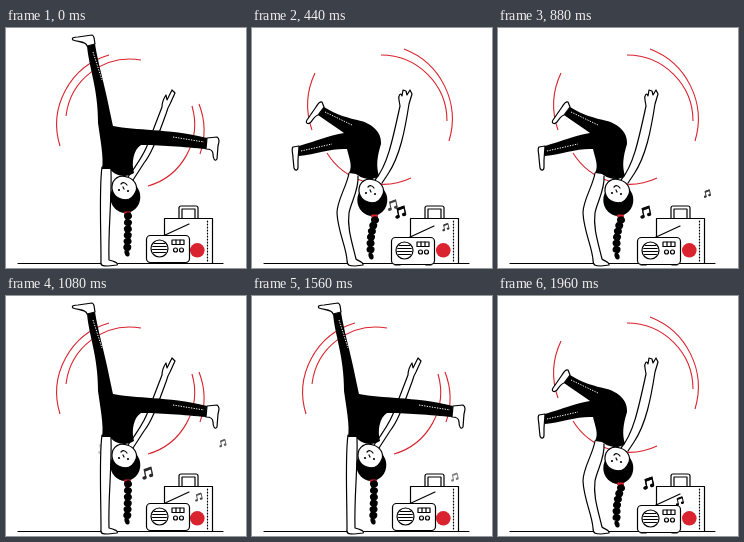
Recreate the animation shown at these times as an HTML page. Size 240 by 240 pixels, loop 2 s.

```html
<!DOCTYPE html>
<html lang="en">
<head>
<meta charset="utf-8">
<title>Handstand to the radio</title>
<style>
  html, body { margin: 0; width: 100%; height: 100%; overflow: hidden; background: #fff; }
  svg { display: block; width: 100vw; height: 100vh; }
  .line { fill: none; stroke: #000; stroke-width: 1.2; stroke-linecap: round; stroke-linejoin: round; }
  .skin { fill: #fff; stroke: #000; stroke-width: 1.2; stroke-linejoin: round; stroke-linecap: round; }
  .arc { fill: none; stroke: #d9232e; stroke-width: 1.1; }
  .stitch { fill: none; stroke: #fff; stroke-width: 1; stroke-dasharray: 1.3 1.3; }
</style>
</head>
<body>
<svg id="stage" viewBox="0 0 240 240"></svg>
<script>
const LOOP = 2000, STEP = 40, BEAT = 125;

const path = (d, cls = '') => `<path class="${cls}" d="${d}"/>`;
const arc = (r, x1, y1, x2, y2) => path(`M${x1} ${y1}A${r} ${r} 0 0 1 ${x2} ${y2}`, 'arc');

const straightArm = 'M96 139C93 160 95 200 95 233C94 238 97 238 102 238L111 237C113 235 107 233 103 232C102 200 106 172 105 142';

const poses = [
  {
    arcs: [[72.5, 54, 118, 103, 27], [64.5, 60, 88, 135, 32], [72.5, 193, 76, 194, 126], [64.5, 186, 78, 142, 158]],
    body: 'M81 18L89 16C92 35 98 55 101 70C104 84 106 94 107 98C130 103 160 100 201 110L200 121C180 119 150 117 135 117C128 121 125 134 128 145C119 151 108 147 104 141L96 141C98 130 94 110 92 95C92 60 83 40 81 18Z',
    feet: ['M81 18C81 14 73 14 67 12C65 10 68 9 72 9L86 7C89 8 88 12 89 16Z',
           'M201 110L211 109C214 111 213 114 212 118L211 131C209 134 207 131 207 126C207 122 203 121 200 121Z'],
    arm: 'M122 149C130 138 137 128 141 118L156 79C156 74 158 70 160 67L161 72L166 62L169 65L164 76C162 79 161 82 160 86C151 110 146 125 138 135L127 152',
    support: straightArm,
    stitches: ['M87 24L96 52', 'M167 109L198 114'],
    head: [0, 0], braid: [122, 188, 122, 208, 121, 225],
    radio: 'translate(0 0)'
  },
  {
    arcs: [[73, 84, 155, 68, 54], [68, 90, 153, 64, 73], [72, 115, 29, 189, 83], [73, 199, 111, 177, 158]],
    body: 'M48 102C70 106 95 106 112 107C124 104 140 98 155 82L162 88C154 105 142 112 130 123C126 133 126 140 129 150C120 155 109 151 104 148L96 147C100 138 96 132 97 125C85 117 65 117 46 112Z',
    feet: ['M48 102L44 101C41 103 42 107 40 112L37 121C37 124 40 124 41 121C42 116 44 113 46 112Z',
           'M155 82L159 79L164 87L172 94C172 97 169 97 166 94L161 88Z'],
    arm: 'M124 154C136 137 142 112 153 86C150 81 153 76 154 73L157 77L156 71L160 70L160 75L164 72L164 79L159 87C154 108 149 128 138 146L131 157',
    support: 'M97 147C91 158 84 172 85 190C87 205 94 218 95 232C95 238 98 238 103 238L111 237C112 234 106 233 104 231C101 214 95 202 97 188C99 174 106 162 106 149',
    stitches: ['M49 106L82 111', 'M135 108L156 87'],
    head: [0, 4], braid: [120, 193, 119, 212, 117, 229],
    radio: 'translate(0 -1)'
  },
  {
    arcs: [[65, 63, 110, 108, 32], [78, 136, 18, 183, 34], [65, 191, 102, 130, 160], [75, 194, 126, 131, 165]],
    body: 'M120 12L128 13C130 45 130 80 126 104C124 119 125 130 128 144C119 151 108 147 104 141L96 141C98 132 96 124 96 117C72 120 45 124 18 126L18 116C45 109 70 103 111 101C114 70 114 40 120 12Z',
    feet: ['M120 12C119 8 118 5 120 3L127 3L140 5C143 7 142 9 138 9C133 9 129 9 128 13Z',
           'M18 116L7 118C4 119 5 122 6 126L7 139C8 143 11 142 11 138L12 130C13 127 16 126 18 126Z'],
    arm: 'M124 150C135 138 146 124 156 112L176 87C177 82 179 79 182 78L181 82L186 74L189 77L187 82C185 86 181 88 179 91C165 113 152 132 130 152',
    support: straightArm,
    stitches: ['M120 25L118 59', 'M21 121L56 114'],
    head: [0, 0], braid: [121, 188, 116, 207, 118, 222],
    radio: 'translate(2 -6) rotate(-5 162 220)'
  },
  {
    arcs: [[75, 60, 102, 63, 45], [66, 129, 27, 195, 93], [75, 152, 21, 197, 113], [66, 159, 150, 75, 125]],
    body: 'M72 79C85 87 96 90 109 93C120 96 130 104 129 116C125 129 124 138 127 148C119 154 109 150 104 146L97 145C101 138 97 130 95 121C80 120 65 126 47 128L47 118C64 113 78 107 92 105C84 99 76 94 66 87Z',
    feet: ['M72 79L70 74C67 73 66 76 64 79L55 92C53 95 56 97 59 94C62 90 63 88 66 87Z',
           'M47 118L41 119C39 121 41 125 41 130L42 140C43 143 46 143 46 139L46 132Z'],
    arm: 'M123 152C135 138 140 115 148 78L147 72C146 67 149 64 150 68L151 62L154 63L155 67L158 62L160 66L157 76C153 102 148 128 136 146L130 155',
    support: 'M97 145C95 158 85 172 85 185C86 204 94 218 95 232C95 238 98 238 103 238L111 237C112 234 106 233 104 231C100 214 95 200 97 185C99 174 107 162 106 148',
    stitches: ['M73 84L100 97', 'M49 123L80 116'],
    head: [1, 3], braid: [123, 192, 117, 208, 119, 228],
    radio: 'translate(-1 2)'
  }
];

// Each drifting note: scale and keys of [time, x, y, opacity].
const notes = [
  { scale: .9, keys: [[80, 152, 190, 1], [440, 141, 177, .75], [680, 137, 168, .5], [1280, 77, 144, .07], [1360, 70, 142, 0]] },
  { scale: 1, keys: [[240, 156, 194, 1], [440, 149, 184, .9], [640, 143, 177, 0]] },
  { scale: 1, keys: [[640, 155, 193, 1], [680, 154, 191, 1], [1080, 142, 177, .6], [1280, 138, 170, .25], [1440, 134, 164, 0]] },
  { scale: 1, keys: [[1880, 154, 191, 1], [1960, 151, 187, 1]] },
  { scale: .65, keys: [[280, 183, 207, 1], [440, 194, 199, .8], [680, 202, 184, .7], [1080, 217, 147, .4], [1280, 237, 137, .1], [1360, 244, 133, 0]] },
  { scale: .7, keys: [[960, 184, 206, 1], [1080, 193, 201, .7], [1280, 196, 186, .35], [1560, 203, 181, .3], [1720, 209, 174, 0]] },
  { scale: .75, keys: [[1880, 178, 208, 1], [1960, 182, 205, 1]] }
];

function drawNote({ scale, keys }, t) {
  const next = keys.findIndex(k => k[0] >= t);
  if (next < 0 || t < keys[0][0]) return '';
  const a = keys[Math.max(0, next - 1)], b = keys[next];
  const u = b === a ? 0 : (t - a[0]) / (b[0] - a[0]);
  const [x, y, opacity] = [1, 2, 3].map(i => a[i] + (b[i] - a[i]) * u);
  return `<g transform="translate(${x} ${y}) rotate(-12) scale(${scale})" opacity="${opacity}">
    <path d="M-3 4V-4L4 -5V3" fill="none" stroke="#000" stroke-width="1.2"/>
    <path d="M-3 -4L4 -5V-3L-3 -2Z"/>
    <ellipse cx="-4.4" cy="4" rx="2.1" ry="1.7"/><ellipse cx="2.6" cy="3" rx="2.1" ry="1.7"/></g>`;
}

const bag = path('M173 190V180Q173 178 175 178H190Q192 178 192 180V190M176 190V181H189V190', 'line') +
  '<rect class="skin" x="158.5" y="190.5" width="48" height="45"/>' +
  path('M201.5 193V233', 'line" stroke-dasharray="1 2') +
  '<circle cx="191.3" cy="222.3" r="7.3" fill="#d9232e"/>';

const stripes = [-5, -2, 1, 4].map(dy => {
  const half = Math.sqrt(64 - dy * dy) - 1;
  return path(`M${153.5 - half} ${220.5 + dy}h${half * 2}`, 'line');
}).join('');

const radio = path('M157 208L183 196', 'line') +
  '<rect class="skin" x="140.5" y="207.5" width="43" height="27" rx="4"/>' +
  '<circle class="skin" cx="153.5" cy="220.5" r="8.5"/>' + stripes +
  '<rect class="skin" x="166" y="212" width="12" height="4.5"/>' + path('M170 212v4M174 212v4', 'line') +
  '<circle class="skin" cx="169.5" cy="222" r="2"/><circle class="skin" cx="175.5" cy="222" r="2"/>' +
  path('M144 235h5M175 235h5', 'line');

const head = '<ellipse cx="119.3" cy="169" rx="15" ry="16"/>' +
  path('M107 154C110 149 115 147 121 149C128 151 132 157 130 163C127 171 121 173 115 171C108 169 104 162 107 154Z', 'skin') +
  '<circle cx="113" cy="162" r="1.1"/><circle cx="122" cy="163" r="1.1"/>' +
  path('M115 156Q118 153 121 157M118 161L117 159', 'line') +
  '<rect x="118" y="183.5" width="7" height="3.2" rx="1.4" fill="#d9232e"/>';

function drawBraid([x0, y0, x1, y1, x2, y2]) {
  let out = '';
  for (let i = 0; i < 7; i++) {
    const u = i / 6, v = 1 - u;
    const x = v * v * x0 + 2 * u * v * x1 + u * u * x2;
    const y = v * v * y0 + 2 * u * v * y1 + u * u * y2;
    const r = i === 6 ? 2.4 : 4;
    out += `<ellipse cx="${x}" cy="${y}" rx="${r}" ry="3.6" transform="rotate(${i % 2 ? 18 : -18} ${x} ${y})"/>`;
  }
  return out;
}

function drawPose(p) {
  return p.arcs.map(a => arc(...a)).join('') +
    path('M12 235.5H217', 'line') + bag +
    `<g transform="${p.radio}">${radio}</g>` +
    path(p.arm, 'skin') + path(p.support, 'skin') + path(p.body) +
    p.feet.map(d => path(d, 'skin')).join('') +
    p.stitches.map(d => path(d, 'stitch')).join('') +
    `<g transform="translate(${p.head})">${head}</g>` + drawBraid(p.braid);
}

const stage = document.getElementById('stage');
const scenes = poses.map(drawPose);
const start = performance.now();

function render(now) {
  const t = Math.floor(Math.max(0, now - start) % LOOP / STEP) * STEP;
  const pose = Math.floor(t / BEAT) % poses.length;
  stage.innerHTML = notes.map(n => drawNote(n, t)).join('') + scenes[pose] +
    notes.slice(1).map(n => drawNote(n, t)).join('');
  requestAnimationFrame(render);
}
render(start);
</script>
</body>
</html>
```
